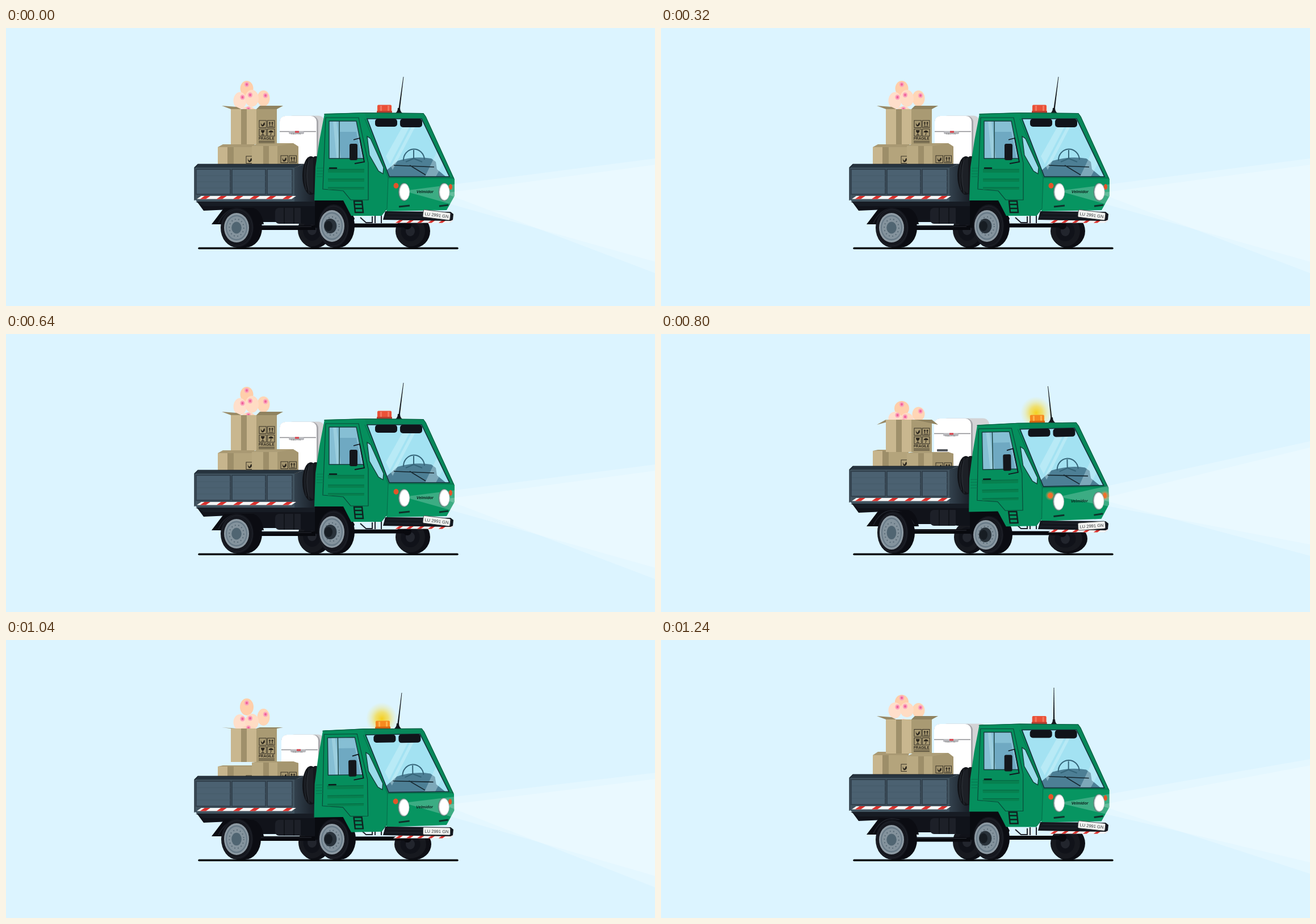
These frames come from a looping animation (1143x490 px, 1.28 s). An HTML page:

```html
<!DOCTYPE html>
<html lang="en">
<head>
<meta charset="utf-8">
<title>Bouncing truck</title>
<style>
html, body { margin: 0; width: 100%; height: 100%; overflow: hidden; background: #dcf4ff; }
svg { display: block; width: 100vw; height: 100vh; }
text { font-family: "Liberation Sans", Arial, sans-serif; }
</style>
</head>
<body>
<svg id="stage" viewBox="0 0 1143 490"></svg>
<script>
const stage = document.getElementById('stage');
const STEP = 40, LOOP = 1280, BOUNCE = 320;

const poly = (pts, fill, more = '') => `<polygon points="${pts}" fill="${fill}" ${more}/>`;
const path = (d, fill, more = '') => `<path d="${d}" fill="${fill}" ${more}/>`;
const line = (d, color, w = 1, more = '') => path(d, 'none', `stroke="${color}" stroke-width="${w}" ${more}`);
const rect = (x, y, w, h, fill, r = 0, more = '') =>
  `<rect x="${x}" y="${y}" width="${w}" height="${h}" rx="${r}" fill="${fill}" ${more}/>`;
const oval = (x, y, rx, ry, fill, more = '') =>
  `<ellipse cx="${x}" cy="${y}" rx="${rx}" ry="${ry}" fill="${fill}" ${more}/>`;
const group = (transform, ...parts) => `<g transform="${transform}">${parts.join('')}</g>`;
const move = (x, y) => `translate(${x} ${y})`;

// Smooth cycle through the values at phases 0, 1/4, 1/2 and 7/8.
let angle = 0;
function wave(v0, v1, v2, v3) {
  const k = Math.SQRT1_2, mid = (v0 + v2) / 2, b = (v0 - v2) / 2;
  const a = (v3 - k * b + k * (v1 + mid)) / (1 + 2 * k);
  const c = v1 + mid - 2 * a;
  return a + b * Math.cos(angle) + c * Math.sin(angle) + (mid - a) * Math.cos(2 * angle);
}

const defs = `<defs>
  <radialGradient id="glow"><stop offset="0" stop-color="#f6cf1e"/>
    <stop offset=".4" stop-color="#f5d940" stop-opacity=".75"/>
    <stop offset=".7" stop-color="#f2e270" stop-opacity=".35"/>
    <stop offset="1" stop-color="#f2e88c" stop-opacity="0"/></radialGradient>
  <radialGradient id="blink"><stop offset="0" stop-color="#f08040"/>
    <stop offset=".4" stop-color="#f08a48" stop-opacity=".75"/>
    <stop offset="1" stop-color="#f09a58" stop-opacity="0"/></radialGradient>
  <linearGradient id="side"><stop offset="0" stop-color="#33414d"/><stop offset="1" stop-color="#171d25"/></linearGradient>
  <clipPath id="shield"><polygon points="636,160 732,160 781,262 675,262"/></clipPath>
</defs>`;

const ink = '#2b261d';
const frame = rect(0, 0, 12.5, 12.5, 'none', 0, `stroke="${ink}" stroke-width=".9"`);
const icons = {
  care: frame + path('M3 3Q3 7 6 8L8 4L9.5 3L10 7Q8 10.5 5 10.5Q2 8 3 3Z', ink),
  up: frame + path('M4 2L6 5H4.7V9H3.3V5H2ZM8.5 2L10.5 5H9.2V9H7.8V5H6.5Z', ink) + line('M2 10.5H10.5', ink),
  glass: frame + path('M3 2H9.5Q9.5 6 6.8 7V10H9V11H3.5V10H5.7V7Q3 6 3 2Z', ink),
  rain: frame + path('M2 6Q3 2.5 6.2 2.5Q9.5 2.5 10.5 6Z', ink) + line('M6.2 6V10Q5.5 11 4.5 10', ink)
};
const icon = (name, x, y) => group(move(x, y), icons[name]);

const stripes = (x, y, len, h, gap) => group(move(x, y) + ' skewX(-55)',
  line(`M0 ${-h / 2}H${len}`, '#f4f4f4', h),
  line(`M${gap * .2} ${-h / 2}H${len}`, '#d9302c', h, `stroke-dasharray="${gap * .35} ${gap * .65}"`));

function ball(x, y, rx, ry, dx, dy, color) {
  return oval(x, y, rx, ry, color) + oval(x + dx, y + dy, 4.2, 4.6, '#fba6bc') + oval(x + dx, y + dy, 2, 2.3, '#f0639a');
}

function balls() {
  return ball(453.5, wave(124, 136, 141, 124), 11, wave(14, 15, 12.5, 13), 3.5, -5, '#ffd6b6')
    + ball(424, wave(106.5, 118, 131, 109), wave(11.5, 12, 13, 12), wave(13.5, 15, 13, 12.5), 0, -7, '#ffceaa')
    + ball(412, wave(128, 145, 149, 124), 11.5, wave(15, 14, 12, 14), 4.5, -6, '#ffdfcb')
    + ball(433, wave(124, 144, 152, 123), 12, wave(15, 14, 13, 13), -3, -6, '#ffdcc4')
    + ball(427, wave(151, 163, 162, 152), 14, 13, 0, -8, '#ffd9c0');
}

function boxes() {
  const left = wave(210, 223, 206, 203), right = wave(208, 216, 210, 205);
  const top = wave(143, 156, 151, 140), base = wave(205, 215, 208, 200);
  const tip = top + wave(-6, -2, 9, -6), label = wave(197, 207, 200, 191.5);
  const peak = wave(5, 2, 2, 6);
  return poly(`373,${left} 382,${left - peak} 438,${left - peak} 436,${left}`, '#a99973')
    + rect(373, left, 63, 80, '#c7b58d') + rect(390, left, 11, 80, '#9d8e69') + rect(401, left, 35, 80, '#b4a47c')
    + icon('care', 423, left + 16)
    + poly(`433,${right} 445,${right - peak} 505,${right - peak} 515,${right + 1} 478,${right}`, '#ad9e78')
    + rect(433, right, 45, 80, '#b9a981') + rect(453, right, 10, 80, '#9d8e69')
    + poly(`478,${right} 506,${right - peak} 515,${right + 1} 515,290 478,290`, '#a59670')
    + icon('care', 484, right + 17) + icon('up', 499, right + 17)
    + poly(`396,${top} 380,${tip} 406,${Math.min(tip, top) + 2} 414,${top}`, '#998a66')
    + rect(396, top, 45, base - top, '#c9b78f') + rect(414, top, 10, base - top, '#9f906b')
    + rect(441, top, 36, base - top, '#a99a73')
    + poly(`441,${top} 447,${Math.min(tip, top)} 488,${tip} 477,${top}`, '#8f825f')
    + icon('care', 446, label - 34) + icon('up', 460.5, label - 34)
    + icon('glass', 446, label - 19) + icon('rain', 460.5, label - 19)
    + `<text x="445" y="${label}" font-size="6.3" font-weight="bold" fill="${ink}">FRAGILE</text>`
    + line(`M445 ${label + 2.5}H473M445 ${label + 5}H473`, ink, .9);
}

function fridge() {
  const x = wave(482, 485, 481, 481), top = wave(155, 167, 149, 148), depth = wave(10, 6, 28, 24);
  const bar = wave(184, 195, 177, 177);
  return rect(x + 12, top - .5, 57 + depth, 110, '#d3d3d5', 11)
    + rect(x, top, 68, 110, '#a7a7ab', 11) + rect(x, top, 65, 110, '#fff', 10)
    + line(`M${x} ${bar - 1.5}H${x + 64}`, '#8c8c90', 1.3) + rect(x + 16, bar - 2, 27, 5, '#b9b9bd', 2)
    + rect(x + 27, bar - 2.5, 7, 3, '#d8404a')
    + `<text x="${x + 20}" y="${bar + 4}" font-size="4" letter-spacing=".7" fill="#777">KALTIN</text>`
    + rect(x + 5, bar + 26, 19, 4, '#55585d', 1);
}

function wheel(x, y, rx, ry, depth, hx, hy, hubX) {
  return oval(x + depth, y, rx, ry, '#0b0c12') + rect(x, y - ry, depth, ry * 2, '#0b0c12')
    + oval(x, y, rx, ry, '#15171e') + oval(x, y, rx - 2, ry - 3, 'none', 'stroke="#22252d"')
    + oval(hubX, y, hx, hy, '#8d9aa3') + oval(hubX, y, hx - 3, hy - 3.5, '#687a87')
    + oval(hubX, y, hx - 5, hy - 6, '#84939d')
    + oval(hubX, y, hx * .58, hy * .58, 'none', 'stroke="#5a6b77" stroke-width="2" stroke-dasharray="2 4.2"')
    + oval(hubX, y, hx * .4, hy * .4, '#506572');
}

function farWheel(x, y, rx, ry) {
  return oval(x + 3, y, rx, ry, '#0d0e14') + oval(x - 2, y, rx - 4, ry - 3, '#17191f')
    + oval(x - 2, y, rx * .55, ry * .6, '#101219') + oval(x - 2, y, 8, 9, '#22252d');
}

function chassis(dy) {
  const drive = wave(352, 350, 348, 351.5), axle = wave(348, 350, 351, 348.5);
  return farWheel(541, wave(356, 357, 358, 356), wave(29, 28, 27, 29), wave(32, 31, 29, 32))
    + farWheel(714, wave(358, 360, 361, 358.5), wave(30, 32, 34, 30), wave(30, 28, 26, 30))
    + line(`M440 ${drive}H545`, '#08090e', 8) + line(`M445 ${drive - 2}H538`, '#2a2d35', 1)
    + line(`M600 ${axle}H712`, '#08090e', 7) + oval(707, axle, 7, 7, '#08090e')
    + line(`M624 334L634 343H645V332M650 330V344M661 330V344`, '#20232b', 2)
    + group(move(0, dy),
      poly('337,307 546,307 546,342 448,342 438,318 348,322', '#11131a'),
      path('M362 346L384 317H436Q450 322 454 346Z', '#0b0c12'),
      line('M374 344Q386 319 406 318Q432 318 446 342', '#20232b', 1.5),
      rect(474, 317, 50, 28, '#1d2028', 7), line('M490 317V345M507 317V345', '#0d0f15', 1.5),
      rect(519, 314, 29, 31, '#10131a', 3));
}

function bed(dy) {
  const panel = (x, w) => rect(x, 249, w, 44, '#4b6171', 0, 'stroke="#2c3a46" stroke-width="1.5"')
    + line(`M${x + 1} 260H${x + w}M${x + 1} 271H${x + w}M${x + 1} 282H${x + w}`, '#455a69', 1);
  return group(move(0, dy),
    poly('508,246 525,240 546,240 546,312 508,307', 'url(#side)'),
    poly('332,246 338,240 525,240 508,246', '#27343f'),
    poly('332,246 508,246 508,307 338,307 332,302', '#41535f'),
    panel(335, 60), panel(398, 59), panel(460, 44),
    stripes(336, 301.5, 167, 5.5, 29),
    line('M332 304V246L338 240H525', '#16212b', 1.2),
    poly('334,306 546,306 546,314 348,314', '#171c24'));
}

function spare() {
  return group(move(0, wave(0, -4, -11, -2)),
    oval(537, 260, 15, 34, '#121419'), oval(541, 260, 13, 31, '#1d2026'),
    line('M529 235Q523 260 529 286M534 229Q527 260 534 292', '#2c3037', 1),
    rect(541, 226, 9, 68, '#15171c', 4));
}

function shieldView() {
  return poly('636,160 732,160 781,262 675,262', '#a3e2f2')
    + `<g clip-path="url(#shield)">`
    + path('M655 264L690 234Q720 225 749 230L757 236L759 249L777 264Z', '#4d7f95')
    + line('M700 234A18 19 0 1 1 737 232M718 215V230L704 236M718 230L733 236', '#356579', 2)
    + poly('706,160 718,160 676,240 669,226', '#d6f4fb', 'opacity=".4"')
    + poly('722,160 728,160 681,250 678,244', '#d6f4fb', 'opacity=".4"')
    + poly('760,216 770,238 757,262 738,262', '#d6f4fb', 'opacity=".35"') + '</g>'
    + poly('636,160 732,160 781,262 675,262', 'none', 'stroke="#143039" stroke-width="1.6"')
    + rect(650, 160, 39, 14, '#11141a', 5) + rect(694, 160, 39, 15, '#11141a', 5)
    + line('M683 242L754 245M711 242L739 259', '#15262e', 1.6);
}

function sideView() {
  const groove = (y, h) => rect(567, y, 64, h, '#07804f', 1) + line(`M567 ${y}H631`, '#05603f', .8);
  return path('M561 151L632 150L674 263L672 318L661 331H608L594 304H543L545 245L552 198Z', '#058f5d')
    + line('M563 158H621L638 238V303H607L594 287L558 284L563 158Z', '#0a4938', 1.2)
    + poly('569,164 617,164 630,230 569,230', '#86bfd4')
    + path('M588 183H617L626 230H588Z', '#6fa9c2')
    + poly('576,164 582,164 590,230 582,230', '#c9eef6', 'opacity=".3"')
    + line('M569 164H617L630 230H569ZM587 164V230', '#143b3b', 1.4)
    + poly('636,191 642,195 665,246 664,257 656,252 640,224', '#9adbea', 'stroke="#123b36" stroke-width="1.3"')
    + groove(249, 6) + groove(266, 5) + groove(281, 4)
    + line('M547 247H559M547 252H559M547 257H559M547 262H559', '#067850', 1.2)
    + line('M570 247H582', '#0d1718', 2.5, 'stroke-linecap="round"')
    + line('M612 197L623 194L631 236L614 239', '#111820', 1.8) + rect(605, 204, 14, 29, '#14171c', 3)
    + line('M613 305L615 325H629L627 305ZM614 311H628M615 318H629', '#10201f', 2.4);
}

const tilt = () =>
  `translate(${wave(0, -1, -1.5, -.3)} ${wave(0, 5, 4.8, -1.5)}) rotate(${wave(0, -.9, -1.15, 0)} 780 270)`;

function cab(lit) {
  return group(tilt(),
    lit ? oval(665, 132, 28, 29, 'url(#glow)') : '',
    rect(654, 135.5, 25, 14, lit ? '#f68a20' : '#ea5138', 2),
    rect(659, 137, 3, 10, lit ? '#ffb44b' : '#f2775f'), rect(672, 137, 3, 10, lit ? '#ffb44b' : '#f2775f'),
    rect(653, 146, 27, 4, lit ? '#cf6512' : '#b53f31', 1),
    poly('561,151 632,149 735,150 740,157 790,267 672,266 632,160', '#07885a'),
    poly('672,264 790,266 790,296 776,321 670,323', '#079561'),
    sideView(), shieldView(),
    line('M560 152L632 149.5L735 150.5L739 156L789 266', '#0a5a40', 1.1),
    line('M632 160L673 264H789M673 264L671 318L661 331', '#076c49', 1),
    line('M692 315L711 313M763 314L779 312', '#0e332b', 3));
}

function lamps(blink) {
  const lamp = x => oval(x, 289, 10, 16, '#5f7f78') + oval(x + .7, 289, 9.3, 15, '#cfd9d8') + oval(x + 1, 289, 8, 13.5, '#fff');
  const signal = (x, y, r) => (blink ? oval(x, y, 9, 9, 'url(#blink)') : '')
    + oval(x, y, r, 5, blink ? '#f0702c' : '#e35429');
  return group(tilt(), signal(687, 278, 4.5), signal(783, 280, 3), lamp(701), lamp(771.5),
    `<text x="723" y="291" font-size="7" font-weight="bold" font-style="italic" fill="#0b241f">Velmidor</text>`);
}

function bumper() {
  return group(move(0, wave(0, 6, 6, -2)),
    stripes(682, 343.5, 99, 5, 19),
    poly('668,323 783,324 788,328 787,338 783,340 664,338', '#14171e'),
    line('M672 327L735 328M668 333L733 334', '#252932', 1))
    + group(`translate(758.5 ${wave(329.5, 337, 338, 327.5)}) rotate(${wave(7, 1, -4, 6)})`,
      rect(-24, -6.5, 48, 13, '#f2f3f1', 2, 'stroke="#454a4d" stroke-width=".9"'),
      `<text y="3" font-size="7.6" text-anchor="middle" fill="#33373a">LU 2991 GN</text>`);
}

function beams() {
  const swing = wave(0, 4, -41, -20);
  const beam = (x, y, top, low) => poly(`${x},${y} 1143,${top + swing} 1143,${low + swing}`, '#fff', 'opacity=".21"');
  return beam(700, 287, 230, 412) + beam(772, 291, 241, 432);
}

function antenna() {
  const x = wave(692, 690, 688, 692), y = wave(147, 153, 153, 146);
  const tx = wave(700, 697, 681.5, 692), ty = wave(86, 93, 92, 84);
  return poly(`${x - 1.3},${y} ${tx - .4},${ty} ${tx + .4},${ty} ${x + 1.3},${y}`, '#15181c')
    + path(`M${x - 6} ${y + 3}Q${x - 2} ${y} ${x - 2} ${y - 6}H${x + 2}Q${x + 2} ${y} ${x + 6} ${y + 3}Z`, '#15181c');
}

function scene(t) {
  const phase = t % BOUNCE;
  angle = phase / BOUNCE * 2 * Math.PI;
  const lit = phase >= 80 && phase < 240, blink = phase >= 120 && phase < 240;
  const dy = wave(0, 0, -7, -3), front = wave(349, 351, 354, 349.5);
  return defs + fridge() + balls() + boxes() + chassis(dy) + bed(dy)
    + wheel(wave(407, 407, 408, 407), wave(352, 351, 350, 352), wave(29, 28, 27, 29), wave(35, 36, 37, 35),
      wave(15, 14, 12, 15), wave(22, 22, 21, 22), wave(26, 28, 30, 26), 406)
    + spare() + antenna()
    + path('M544 302H596L614 336L606 352H544Z', '#090b10')
    + wheel(577, front, wave(27, 27, 26, 27), 387 - front, wave(10, 12, 16, 10), 22, wave(28, 27, 26, 28), wave(574, 574, 572, 574))
    + oval(571, front, 11, 13, '#29323a') + oval(568, front, 7, 9, '#171d23')
    + cab(lit) + beams() + lamps(blink) + bumper()
    + line('M340 388.3H795', '#05070b', 3.4, 'stroke-linecap="round"');
}

let shown = -1;
function tick(now) {
  const t = Math.floor(now % LOOP / STEP) * STEP;
  if (t !== shown) stage.innerHTML = scene(shown = t);
  requestAnimationFrame(tick);
}
tick(performance.now());
</script>
</body>
</html>
```
